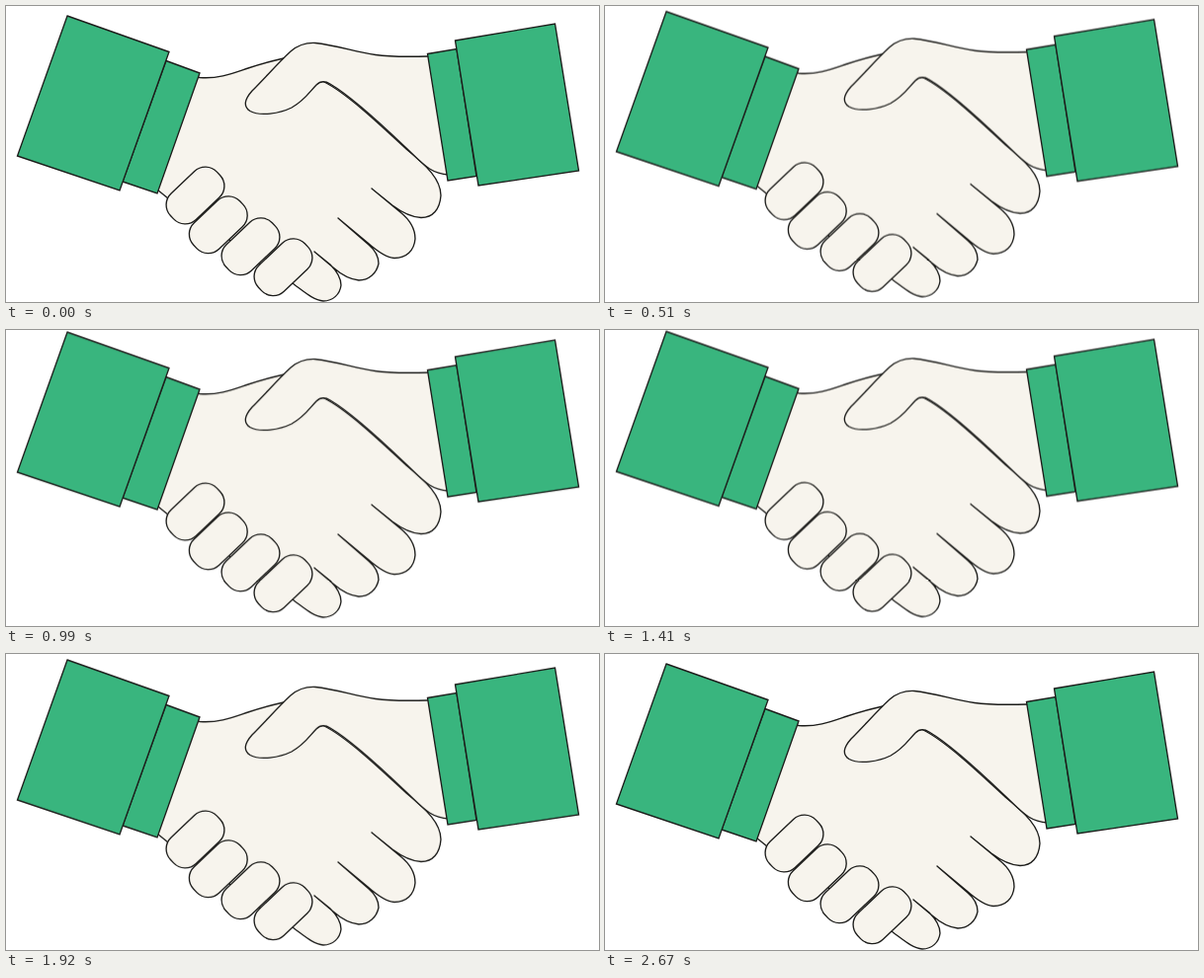
These frames come from a looping animation (600 by 300 pixels, 2700 ms). An HTML page:

```html
<!DOCTYPE html>
<html lang="en">
<head>
<meta charset="utf-8">
<title>Handshake</title>
<style>
  html, body {
    margin: 0;
    width: 100%;
    height: 100%;
    overflow: hidden;
    background: #fff;
  }
  svg { display: block; width: 600px; height: 300px; }
  .shake {
    stroke: #1c1c1a;
    stroke-width: 1.35;
    stroke-linejoin: round;
    animation: shake 2.7s cubic-bezier(.167, .167, .667, 1) infinite;
  }
  .skin { fill: #f7f4ed; }
  .cloth { fill: #39b57e; stroke-linejoin: miter; }
  @keyframes shake {
    0%, 100% { transform: translateY(0); }
    50% { transform: translateY(-9px); }
  }
</style>
</head>
<body>
<svg viewBox="0 0 600 300">
  <defs>
    <rect id="knuckle" x="-32.3" y="-18.3" width="64.6" height="36.6" rx="16" transform="rotate(-43.5)"/>
  </defs>
  <g class="shake">
    <g class="skin">
      <!-- left hand with its four fingertips -->
      <path d="M185 71L196 72.500C216 74 230 68 245 63C257 59 268 56 281 53L322 77
        C344 88 376 118 405 145C426 162 440 176 440 192
        C439 206 432 214.500 420 214.500C409 214 399 208 391 202L370 185
        L399 209C409 217 414 226 414 236C413 248 405 255.500 393 255.500C384 255 375 248 366 240L336 215
        L367 242C374 248 377 254 377 261C375 271 367 278 357 278C347 277 339 272 331 265L312 249
        L328 262C335 269 339 276 339 283C338 292 331 299 321 299C310 298 300 288 287 279
        L258 262L226 237L194 216L164 195L148 182Z"/>
      <!-- right hand with thumb -->
      <path d="M440 50L428 51C408 51.500 390 52 374 49.500C352 46 333 39.500 313 37.500C303 37 295 40 288 46
        C275 58 263 72 249 86C241 95 240 102 247 106.500
        C257 112 277 109 289 103C302 96 308 86 314 80
        C318 76 323 76 328 79C350 92 377 117 404 143
        C422 160 429 170 448 171L460 171Z"/>
      <use href="#knuckle" x="191.500" y="192"/>
      <use href="#knuckle" x="214.800" y="221.700"/>
      <use href="#knuckle" x="247.500" y="243.700"/>
      <use href="#knuckle" x="280.500" y="264.700"/>
    </g>
    <g class="cloth">
      <path d="M162 55.500L196 68L153 190L118 178Z"/>
      <path d="M62 10L165 46.500L115 187L11.500 152Z"/>
      <path d="M426.500 48.500L456 43.500L476 172.500L447 177Z"/>
      <path d="M454.500 35L555.500 18L579.500 167L478 182Z"/>
    </g>
  </g>
</svg>
</body>
</html>
```
